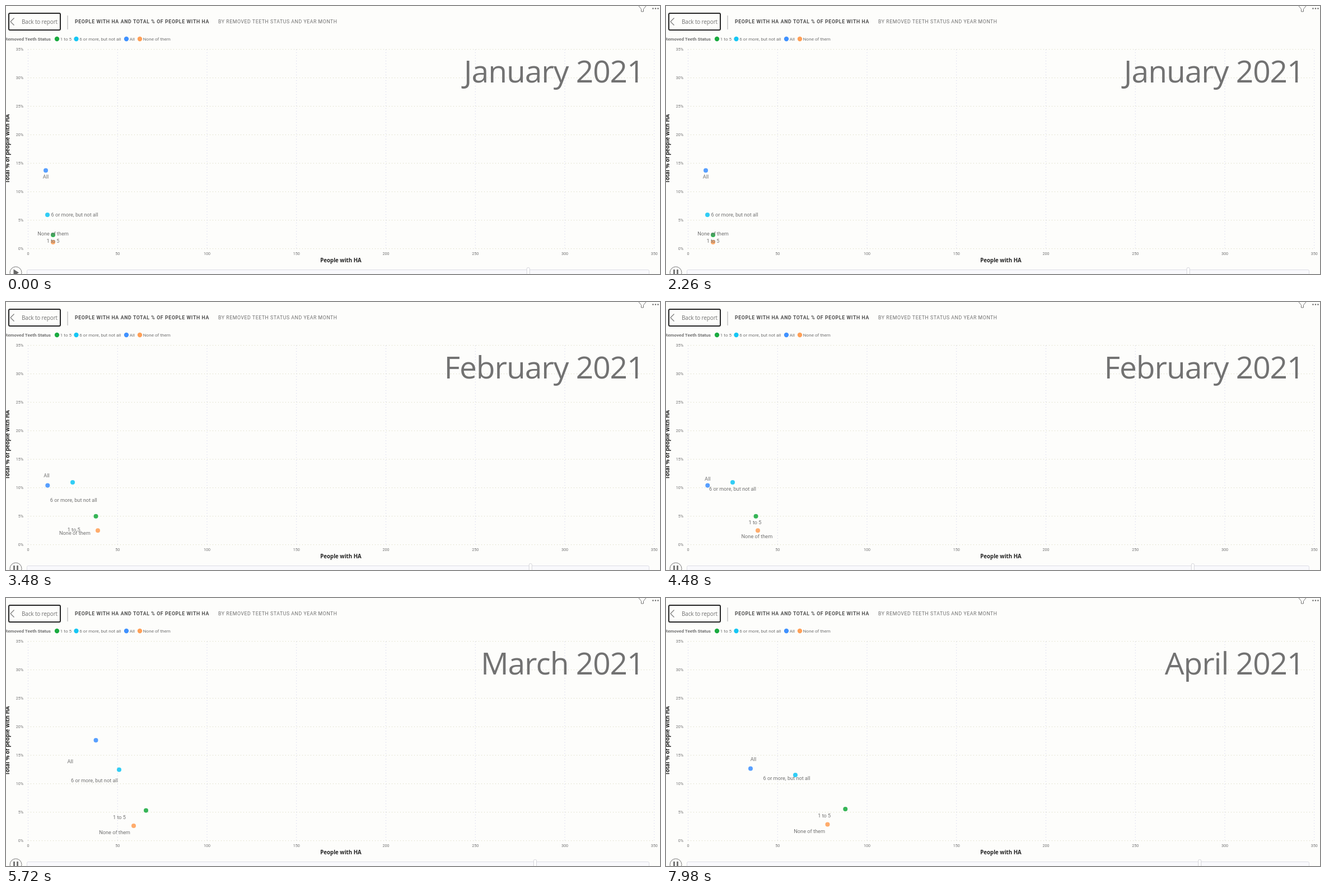
An HTML page that plays this animation: 1168x480 px, repeating every 8 s.

```html
<!DOCTYPE html>
<html lang="en">
<head>
<meta charset="utf-8">
<style>
  html, body { margin: 0; width: 100%; height: 100%; overflow: hidden; background: #fdfdfb; }
  svg { display: block; }
  text { font-family: Roboto, sans-serif; fill: #727272; }
  .open { font-family: "Open Sans", sans-serif; }
  .tick { font-size: 7.2px; }
  .legend { font-size: 8.1px; }
  .label { font-size: 9.2px; text-anchor: middle; }
  .axis { font-size: 9.7px; font-weight: 700; fill: #222; text-anchor: middle; }
  .title { font-size: 8.8px; letter-spacing: .52px; }
  .strong { font-weight: 700; fill: #505050; letter-spacing: .6px; }
  .month { font-size: 55px; letter-spacing: -1px; text-anchor: end; }
  .line { fill: none; stroke: #777; }
</style>
</head>
<body>
<svg id="stage" width="1168" height="480" viewBox="0 0 1168 480">
  <rect x="5" y="13" width="92" height="30" rx="2" fill="none" stroke="#252525" stroke-width="2"/>
  <path class="line" d="M14.5 21.5L8 28L14.5 34.5" stroke-width="1.2"/>
  <text class="open" x="28" y="31.5" font-size="10" letter-spacing="-.15">Back to report</text>
  <path class="line" d="M110 17V42" style="stroke:#aaa"/>
  <text class="title strong" x="123" y="31">PEOPLE WITH HA AND TOTAL % OF PEOPLE WITH HA</text>
  <text class="title" x="379" y="31">BY REMOVED TEETH STATUS AND YEAR MONTH</text>
  <path class="line" d="M1130 0L1134.5 5.5V10H1138.5V5.5L1143 0"/>
  <g fill="#666"><circle cx="1155.5" cy="4.5" r="1.2"/><circle cx="1160" cy="4.5" r="1.2"/><circle cx="1164.5" cy="4.5" r="1.2"/></g>
  <text class="legend" x="-2" y="61.5" font-weight="700">Removed Teeth Status</text>
  <g id="chart"></g>
  <text class="axis open" x="598" y="459">People with HA</text>
  <text class="axis open" transform="translate(6 255.5) rotate(-90)">Total % of people with HA</text>
  <text class="month open" id="month" x="1139.5" y="137"></text>
  <g id="dots"></g>
  <g id="labels"></g>
  <rect x="37.5" y="472.5" width="1111" height="12" rx="2" fill="#f9f9fc" stroke="#dcdce5"/>
  <rect id="handle" y="468.5" width="5" height="16" rx="2" fill="#fff" stroke="#d4d4da"/>
  <circle cx="17.5" cy="477.5" r="10.5" fill="#fdfdfb" stroke="#777"/>
  <path id="play" d="M13.5 471.5V484L23 477.5Z" fill="#666"/>
  <path id="pause" d="M14.5 472V484M20.5 472V484" stroke="#777" stroke-width="3"/>
</svg>
<script>
const LOOP = 8000, PLAY_AT = 600, FIRST_STEP = 2850, STEP = 2265;
const DOT_TIME = 500, LABEL_TIME = 1760;
const months = ["January", "February", "March", "April"];

// One [x, y] per month; label offsets are relative to the dot.
const series = [
  { name: "None of them", color: "#ffa058", legendX: 239,
    dots: [[84, 423], [164, 409.3], [228, 408], [288.5, 405.5]], first: [0, -15] },
  { name: "1 to 5", color: "#1aab40", legendX: 91,
    dots: [[84, 410], [160.5, 383.7], [250, 380.5], [320.3, 378]] },
  { name: "6 or more, but not all", color: "#15c6f4", legendX: 125.5,
    dots: [[74, 374], [119, 323], [202, 307.5], [231, 317]], first: [48.5, 0] },
  { name: "All", color: "#4092ff", legendX: 215,
    dots: [[71, 294.5], [74.3, 328.5], [160.5, 254.7], [151, 305.5]], second: [0, -11] }
];

const byId = id => document.getElementById(id);
function add(parent, tag, attrs, text = "") {
  const el = document.createElementNS("http://www.w3.org/2000/svg", tag);
  for (const key in attrs) el.setAttribute(key, attrs[key]);
  el.textContent = text;
  return byId(parent).appendChild(el);
}
function gridLine(d, stroke) {
  add("chart", "path", { d, stroke, "stroke-dasharray": "1 4" });
}

for (let i = 0; i < 8; i++) {
  const x = 39.5 + 159.75 * i, y = 434.7 - 51 * i;
  gridLine(`M${x} 78V435`, "#c9c9e6");
  gridLine(`M39 ${y}H1158`, "#d2d2b4");
  add("chart", "text", { class: "tick", x, y: 446, "text-anchor": "middle" }, i * 50);
  add("chart", "text", { class: "tick", x: 31, y: y + 2.5, "text-anchor": "end" }, i * 5 + "%");
}

for (const s of series) {
  add("chart", "circle", { cx: s.legendX, cy: 59, r: 4.2, fill: s.color });
  add("chart", "text", { class: "legend", x: s.legendX + 5.8, y: 61.5 }, s.name);
  s.dot = add("dots", "circle", { r: 4, fill: s.color, "fill-opacity": .88 });
  s.label = add("labels", "text", { class: "label" }, s.name);
  s.labels = s.dots.map(([x, y], i) => {
    const [dx, dy] = [s.first, s.second][i] || [0, 11];
    return [x + dx, y + dy];
  });
}

const progress = (elapsed, duration) => Math.min(1, Math.max(0, elapsed / duration));
const easeInOut = p => p * p * (3 - 2 * p);
const easeOut = p => 1 - (1 - p) ** 1.5;

function between(points, index, p) {
  const from = points[Math.max(0, index - 1)], to = points[index];
  return from.map((v, i) => v + (to[i] - v) * p);
}

function draw(t) {
  const index = Math.max(0, Math.floor((t - FIRST_STEP) / STEP) + 1);
  const elapsed = t - FIRST_STEP - (index - 1) * STEP;
  const dotP = easeInOut(progress(elapsed, DOT_TIME));
  const labelP = easeOut(progress(elapsed, LABEL_TIME));

  for (const s of series) {
    const [cx, cy] = between(s.dots, index, dotP);
    const [x, y] = between(s.labels, index, labelP);
    s.dot.setAttribute("cx", cx);
    s.dot.setAttribute("cy", cy);
    s.label.setAttribute("x", x);
    s.label.setAttribute("y", y + 3);
  }
  byId("month").textContent = months[index] + " 2021";
  byId("handle").setAttribute("x", 930.2 + 8.3 * (index ? index - 1 + labelP : 0));
  byId("play").style.display = t < PLAY_AT ? "" : "none";
  byId("pause").style.display = t < PLAY_AT ? "none" : "";
}

const start = performance.now();
function tick() {
  draw((performance.now() - start) % LOOP);
  requestAnimationFrame(tick);
}
tick();
</script>
</body>
</html>
```
